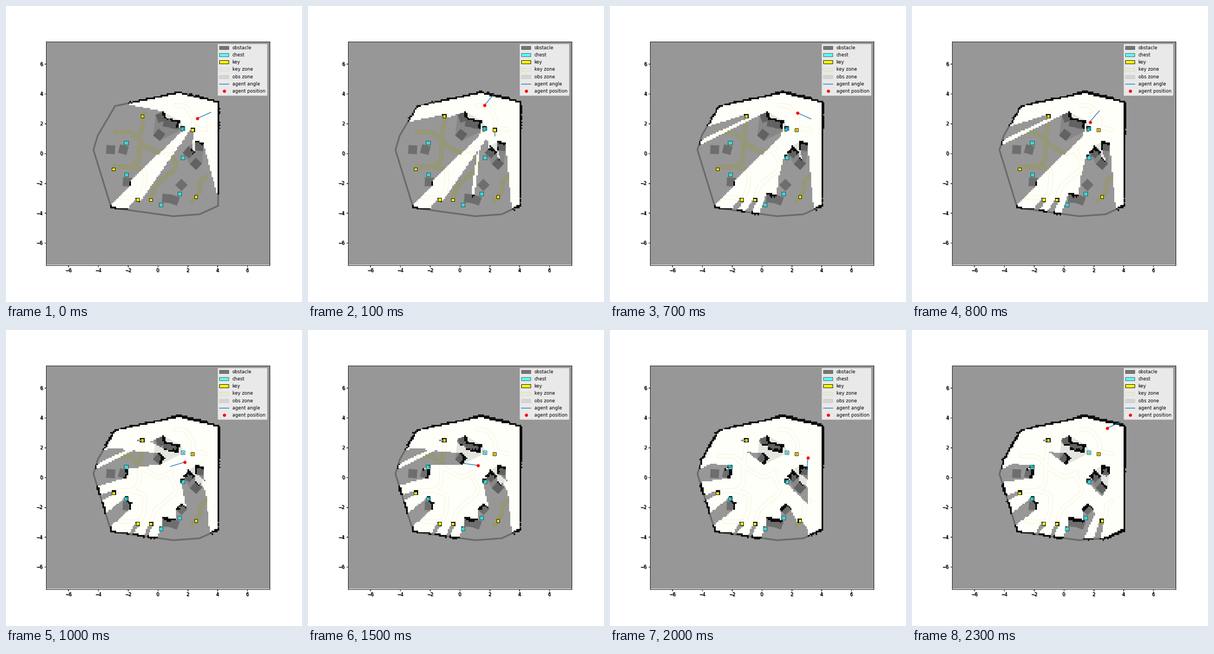
A matplotlib script that plays this animation: 540 px wide and 540 px high, repeating every 5100 ms.

```python
import numpy as np
import matplotlib.pyplot as plt
from matplotlib.animation import FuncAnimation
from matplotlib.lines import Line2D
from matplotlib.patches import Patch, Polygon
from matplotlib.path import Path

SIZE, DPI = 540, 60
LEFT, BOTTOM, SIDE = 72.6, 472.5, 408
UNIT = SIDE / 15
N = 150
CELL = SIDE / N
FREE, OCCUPIED = 1, 2
COLORS = np.array([          # unknown, free, occupied
    [0.494, 0.494, 0.494, 0.8],
    [1, 1, 0.984, 0.99],
    [0.03, 0.03, 0.03, 0.95],
])


def world(points):
    """Stage pixels to axis units."""
    p = np.asarray(points, float)
    return (p - [LEFT + SIDE / 2, BOTTOM - SIDE / 2]) / [UNIT, -UNIT]


def square(x, y, half, tilt=0):
    a = np.radians(tilt + np.array([45, 135, 225, 315]))
    r = half * np.sqrt(2)
    return np.column_stack([x + r * np.cos(a), y + r * np.sin(a)])


def hull(polys):
    """Outermost point in each direction."""
    p = np.vstack(polys)
    a = np.linspace(0, 2 * np.pi, 72)
    return p[(p @ [np.cos(a), np.sin(a)]).argmax(axis=0)]


WALL = np.array([(199, 182.5), (316, 158), (388, 175.5), (387, 364.5),
                 (353, 380), (305, 383.5), (192, 368), (159.5, 262.5),
                 (167.5, 236)])
INNER_WALL = WALL.mean(axis=0) + 0.985 * (WALL - WALL.mean(axis=0))

# centre and tilt of equal boxes
BOXES = [(283, 203, -20), (295, 213, 8), (308, 216, 8), (279.5, 235, 38),
         (333.5, 267, 40), (352.5, 256, 6), (346.5, 288, 42),
         (191, 262, 3), (214, 262, 15), (221, 321, 3),
         (320, 326.5, 45), (293, 351, 5), (307, 354, 20)]
OBSTACLES = [square(x, y, 7.8, tilt) for x, y, tilt in BOXES]
OBS_ZONES = [hull(OBSTACLES[:4] + [square(322, 222, 2)]),
             hull(OBSTACLES[4:7])]

CHESTS = [(322.5, 223.5), (322.5, 276.5), (219, 249.5), (219.5, 307.5),
          (316.5, 342.5), (282.5, 362.5)]
KEYS = [(340, 226), (248.5, 201), (196, 297.5), (240, 353), (264, 353.5),
        (346.5, 348)]

# bends of the key zones
ZONES = [
    [(197, 230), (228, 230), (250, 253), (280, 270), (304, 258)],
    [(252, 193), (244, 240), (243, 283), (228, 293), (196, 294)],
    [(228, 293), (254, 300), (252, 332), (244, 351), (208, 349)],
    [(298, 264), (313, 294), (272, 328), (264, 352)],
    [(308, 181), (328, 183), (343, 206), (341, 221), (366, 226)],
    [(365, 311), (354, 321), (354, 338), (339, 357)],
]

# way points in tenths of a second: time, x, y
ROUTE = np.array([
    (0, 349, 205), (0.5, 356, 195), (1, 322, 181), (2, 349, 205),
    (5, 315, 198), (6, 325, 172), (7, 342, 195), (9, 307, 228),
    (10, 326, 241), (15, 310, 247), (16, 298, 260), (20, 361, 233),
    (21, 372, 253), (23, 356, 179)])
TURN_TIMES = [0, 5, 7, 10, 16, 20, 23]
TURN_ANGLES = [24, 152, -24, 197, 167, 265, 384]
CHANGES = [0, 1, 3, 5, 6, 7, 8, 10, 15, 16, 17, 18, 20, 22, 23]
KEY_TAKEN, CHEST_TAKEN = 2, 10   # times


def place(t):
    return np.array([np.interp(t, ROUTE[:, 0], ROUTE[:, k]) for k in (1, 2)])


def facing(t):
    a = np.radians(np.interp(t, TURN_TIMES, TURN_ANGLES))
    return np.array([np.cos(a), -np.sin(a)])


mid = (np.arange(N) + 0.5) * CELL
gx, gy = np.meshgrid(LEFT + mid, BOTTOM - mid)
CENTERS = np.column_stack([gx.ravel(), gy.ravel()])


def mask(poly):
    return Path(poly).contains_points(CENTERS).reshape(N, N)


def scan(grid, blocked, pos):
    """Cast rays from pos; mark cells passed as free, cells hit as occupied."""
    angle = np.linspace(0, 2 * np.pi, 720, endpoint=False)[:, None]
    dist = np.arange(330.0)
    col = ((pos[0] + dist * np.cos(angle) - LEFT) / CELL).astype(int)
    row = ((BOTTOM - pos[1] + dist * np.sin(angle)) / CELL).astype(int)
    col, row = col.clip(0, N - 1), row.clip(0, N - 1)
    first = blocked[row, col].argmax(axis=1)
    passed = dist < first[:, None]
    grid[row[passed], col[passed]] = FREE
    rays = np.arange(len(first))
    for depth in (0, 2):
        r, c = row[rays, first + depth], col[rays, first + depth]
        hit = blocked[r, c]
        grid[r[hit], c[hit]] = OCCUPIED


def explore():
    solid = (OBSTACLES + [square(x, y, 4) for x, y in CHESTS]
             + [square(x, y, 4) for x, y in KEYS])
    blocked = ~mask(INNER_WALL)
    for s in solid:
        blocked |= mask(s)
    taken = {KEY_TAKEN: mask(square(*KEYS[0], 4)),
             CHEST_TAKEN: mask(square(*CHESTS[0], 4))}
    grid = np.zeros((N, N), int)
    images = {}
    for t in sorted(set(CHANGES) | set(ROUTE[:, 0])):
        if t in taken:
            blocked &= ~taken[t]
            grid[taken[t]] = FREE
        scan(grid, blocked, place(t))
        images[t] = COLORS[grid]
    return images


def zone_distance():
    """Distance in pixels to the nearest zone centre line."""
    x, y = np.meshgrid(np.arange(185, 385, 0.6), np.arange(170, 375, 0.6))
    best = np.full(x.shape, 1e9)
    for line in ZONES:
        p = np.array(line, float)
        t = np.linspace(0, len(p) - 1, 20 * len(p))
        xs, ys = (np.convolve(np.pad(np.interp(t, range(len(p)), p[:, k]),
                                     6, mode="edge"),
                              np.ones(13) / 13, mode="valid")
                  for k in (0, 1))
        for qx, qy in zip(xs, ys):
            best = np.minimum(best, (x - qx) ** 2 + (y - qy) ** 2)
    grid = world(np.column_stack([x.ravel(), y.ravel()]))
    return (grid[:, 0].reshape(x.shape), grid[:, 1].reshape(x.shape),
            np.sqrt(best))


fig = plt.figure(figsize=(SIZE / DPI, SIZE / DPI), dpi=DPI, facecolor="white")


def make_axes(shift):
    a = fig.add_axes([(LEFT + shift) / SIZE, 1 - (BOTTOM + shift) / SIZE,
                      SIDE / SIZE, SIDE / SIZE], facecolor="none")
    a.set(xlim=(-7.5, 7.5), ylim=(-7.5, 7.5),
          xticks=range(-6, 7, 2), yticks=range(-6, 7, 2))
    return a


# a second, slightly shifted frame thickens the labels and two edges
make_axes(0.7)
ax = make_axes(0)


def add_poly(points, **style):
    ax.add_patch(Polygon(world(points), closed=True, **style))


zx, zy, zd = zone_distance()
ax.contourf(zx, zy, zd, levels=[-1, 3.7], colors=["#ffff70"], zorder=0.2)
ax.contour(zx, zy, zd, levels=[3.7], colors=["#a09030"], linewidths=0.8,
           alpha=0.16, zorder=2)
add_poly(WALL, fill=False, ec="#232323", lw=3.6, zorder=0.3)
for o in OBSTACLES:
    add_poly(o, fc="#373737", ec="#373737", lw=0.5, zorder=0.4)

images = explore()
view = ax.imshow(images[0], extent=(-7.5, 7.5, -7.5, 7.5), origin="lower",
                 interpolation="nearest", aspect="auto", zorder=1)

for z in OBS_ZONES:
    add_poly(z, fc="black", ec="none", alpha=0.1, zorder=2)
for c in CHESTS:
    add_poly(square(*c, 3.9), fc="cyan", ec="black", alpha=0.6, lw=1, zorder=3)
for k in KEYS:
    add_poly(square(*k, 2.6), fc="yellow", ec="black", lw=1, zorder=3)


def add_dot(center):
    x, y = world(center)
    return ax.plot(x, y, "o", ms=2.6, mew=0, color="red", zorder=4)[0]


key_dot, chest_dot = add_dot(KEYS[0]), add_dot(CHESTS[0])
heading, = ax.plot([], [], color="#1f77b4", lw=1.5, zorder=4)
agent, = ax.plot([], [], "o", color="red", ms=6, zorder=4.5)

ax.legend(handles=[
    Patch(fc="#757575", ec="#5c5c5c", label="obstacle"),
    Patch(fc="cyan", ec="black", alpha=0.6, label="chest"),
    Patch(fc="yellow", ec="black", label="key"),
    Patch(fc="#e8e8da", ec="#dddcc6", label="key zone"),
    Patch(fc="#d4d4d4", ec="#c8c8c8", label="obs zone"),
    Line2D([], [], color="#1f77b4", lw=1.5, label="agent angle"),
    Line2D([], [], color="red", marker="o", ms=6, ls="none",
           label="agent position"),
], loc="upper right", fontsize=10)


def draw(frame):
    t = max(c for c in CHANGES if c <= frame)
    pos = place(t)
    line = world([pos, pos + UNIT * facing(t)])
    view.set_data(images[t])
    heading.set_data(line[:, 0], line[:, 1])
    agent.set_data(line[:1, 0], line[:1, 1])
    key_dot.set_visible(t >= KEY_TAKEN)
    chest_dot.set_visible(t >= CHEST_TAKEN)
    return view, heading, agent, key_dot, chest_dot


anim = FuncAnimation(fig, draw, frames=51, interval=100, repeat=True,
                     repeat_delay=0, blit=False)
plt.show()
```
